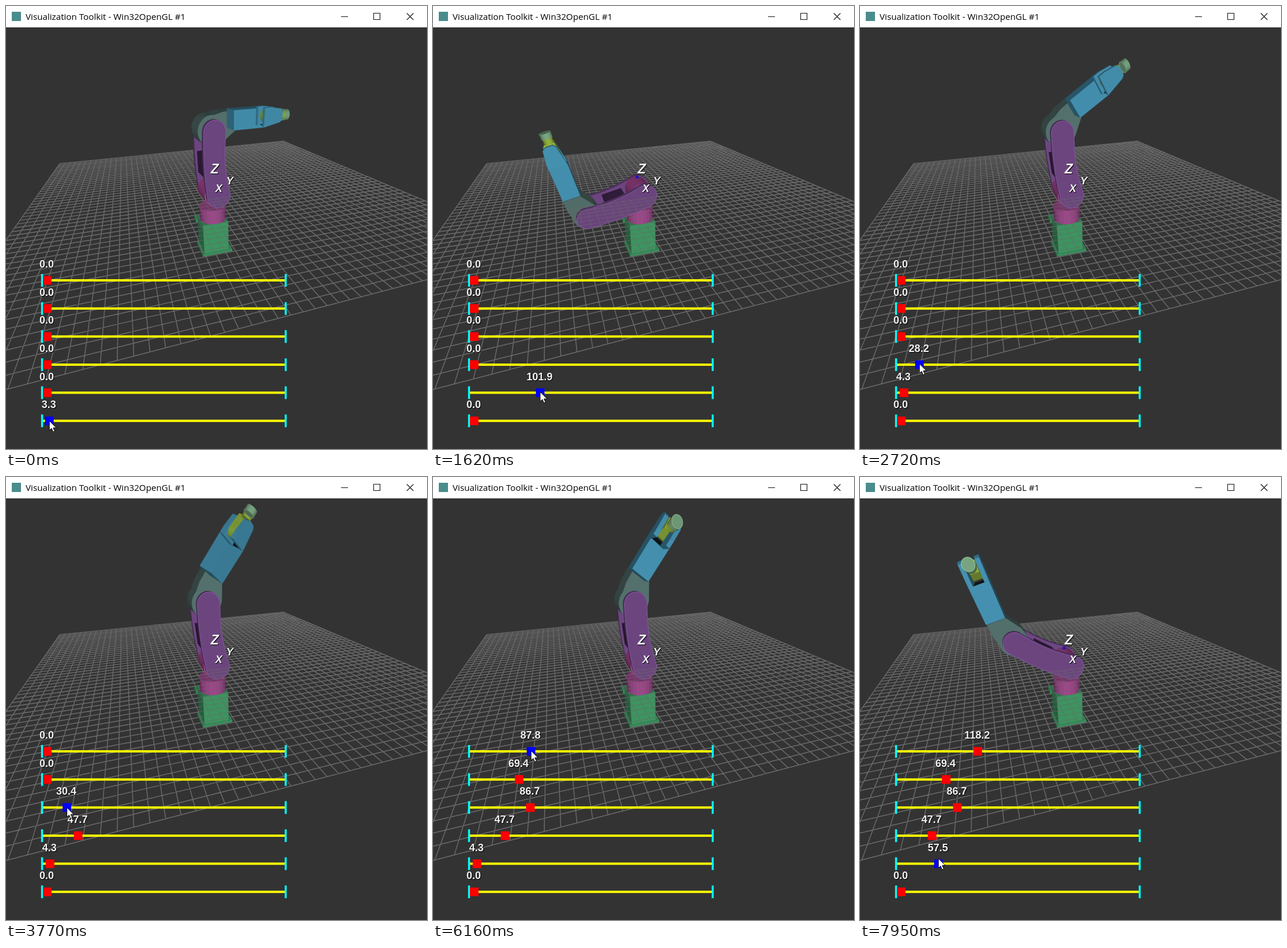
Write an HTML page that moves like this. It is 730 px wide and 767 px high and loops after 7.99 s.

```html
<!DOCTYPE html>
<html lang="en">
<head>
<meta charset="utf-8">
<title>Robot arm sliders</title>
<style>
html, body { margin: 0; width: 100%; height: 100%; overflow: hidden; background: #333; }
svg { display: block; width: 730px; height: 767px; }
.title { font: 15.2px "Open Sans", "Noto Sans", sans-serif; }
.label { font: bold 18px "Liberation Sans", Arial, sans-serif; text-anchor: middle; fill: #f2f2f2; text-shadow: 1px 1px 1px #000; }
.axis { font-style: italic; }
</style>
</head>
<body>
<svg viewBox="0 0 730 767">
  <defs>
    <clipPath id="below"><path d="M0 767H730V280L0 382Z"/></clipPath>
    <path id="grid" fill="none" stroke="#696969" stroke-width="1.4"/>
  </defs>
  <rect width="730" height="767" fill="#333"/>
  <use href="#grid"/>
  <g id="arm" stroke-linejoin="round"></g>
  <g clip-path="url(#below)" opacity="0.5"><use href="#grid"/></g>
  <g class="label axis">
    <text x="362" y="290" style="font-size:23px">Z</text>
    <text x="369" y="322">X</text>
    <text x="388" y="309">Y</text>
  </g>
  <g id="sliders"></g>
  <rect width="730" height="37" fill="#fff"/>
  <rect x="10" y="10" width="16" height="16" fill="#4a8c8c"/>
  <text class="title" x="34" y="24">Visualization Toolkit - Win32OpenGL #1</text>
  <path d="M581 18.5H593M637.5 12.5H648.5V23.5H637.5ZM695 12.5L706.5 24M706.5 12.5L695 24" fill="none" stroke="#111" stroke-width="1.1"/>
  <path id="cursor" d="M0 0V16.5L3.8 13L6.5 19.2L9.3 18L6.6 12H12Z" fill="#fff" stroke="#000" stroke-width="1"/>
</svg>
<script>
const LOOP = 7990;
const $ = id => document.getElementById(id);
const lerp = (a, b, f) => a + (b - a) * f;
const clamp = f => Math.max(0, Math.min(1, f));
const smooth = f => f * f * (3 - 2 * f);

// Sliders count from the top; lift is where the pointer ends, relative to the row
const START = [0, 0, 0, 0, 0, 3.3];
const drags = [
  [5, 0, 530, 2.2, -15],
  [5, 580, 800, 0, -15],
  [4, 950, 1600, 101.9, -2],
  [4, 1660, 2400, 4.3, -2],
  [3, 2570, 2700, 28.2, -3],
  [3, 2740, 3150, 47.7, -3],
  [2, 3550, 4180, 86.7, 0],
  [1, 4750, 5400, 69.4, -2],
  [0, 5750, 6140, 87.8, -2],
  [0, 6180, 6400, 118.2, -2],
  [4, 6850, 7930, 57.5, -9]
].map(([slider, from, to, value, lift]) => ({ slider, from, to, value, lift }));

const rowY = i => 475 + 48.65 * i;
const knobX = v => 71.5 + 1.1222 * v;

function valuesAt(t) {
  const values = [...START];
  for (const d of drags)
    values[d.slider] = lerp(values[d.slider], d.value, clamp((t - d.from) / (d.to - d.from)));
  return values;
}

function pointerAt(t, values) {
  const i = drags.findLastIndex(d => d.from <= t), d = drags[i], next = drags[i + 1];
  const x = knobX(values[d.slider]);
  const y = rowY(d.slider) + d.lift * clamp((t - d.from) / (d.to - d.from));
  if (t <= d.to || !next) return [x, y];
  const f = smooth((t - d.to) / (next.from - d.to));
  return [lerp(x, knobX(values[next.slider]), f), lerp(y, rowY(next.slider), f)];
}

function heldAt(t) {
  const i = drags.findLastIndex(d => d.from <= t), d = drags[i], next = drags[i + 1];
  const same = next && next.slider === d.slider;
  return same || t <= d.to + 40 ? d.slider : -1;
}

// Camera: x runs along the arm, y towards the viewer, z up
const eye = [-192, 740, 304];
const depth = ([x, y, z]) => 0.731 + 0.000204 * x - 0.000742 * y - 0.0004714 * z;
function project(p) {
  const [x, y, z] = p, w = depth(p);
  return [(260.85 + 0.4861 * x - 0.1505 * y - 0.1846 * z) / w,
          (234 + 0.0087 * x - 0.0867 * y - 0.554 * z) / w];
}
const pathOf = pts => "M" + pts.map(p => project(p).map(n => n.toFixed(1)).join(" ")).join("L");

const sub = (a, b) => a.map((n, i) => n - b[i]);
const dot = (a, b) => a[0] * b[0] + a[1] * b[1] + a[2] * b[2];
const cross = (a, b) => [a[1] * b[2] - a[2] * b[1], a[2] * b[0] - a[0] * b[2], a[0] * b[1] - a[1] * b[0]];
const mean = pts => [0, 1, 2].map(i => pts.reduce((s, p) => s + p[i], 0) / pts.length);
const shift = (p, x, y, z) => [p[0] + x, p[1] + y, p[2] + z];
function rot(p, i, j, deg) {
  const c = Math.cos(deg * Math.PI / 180), s = Math.sin(deg * Math.PI / 180), q = [...p];
  q[i] = p[i] * c - p[j] * s;
  q[j] = p[i] * s + p[j] * c;
  return q;
}

function arc(cx, cy, r, from, to, n = 14) {
  return Array.from({ length: n + 1 }, (_, i) => {
    const a = lerp(from, to, i / n) * Math.PI / 180;
    return [cx + r * Math.cos(a), cy + r * Math.sin(a)];
  });
}
const circle = r => arc(0, 0, r, 0, 345, 23);
const box = (x0, y0, x1, y1) => [[x0, y0], [x1, y0], [x1, y1], [x0, y1]];

function face(pts, normal, color, rim) {
  const view = sub(eye, mean(pts)), facing = dot(normal, view);
  if (facing <= 0) return "";
  const lit = 0.48 + 0.54 * facing / Math.sqrt(dot(normal, normal) * dot(view, view));
  const tint = k => `rgb(${color.map(c => Math.min(255, Math.round(c * k)))})`;
  return `<path d="${pathOf(pts)}Z" fill="${tint(lit)}" stroke="${tint(rim ? lit * 1.22 : lit)}" stroke-width="${rim ? 1.1 : 0.6}"/>`;
}

// Sweeps a flat outline along one axis, placed in the world by a joint chain
function prism(outline, axis, lo, hi, place, color, rim = false) {
  const ring = t => outline.map(([u, v]) =>
    place(axis === 0 ? [t, u, v] : axis === 1 ? [u, t, v] : [u, v, t]));
  const a = ring(lo), b = ring(hi), n = a.length, along = sub(b[0], a[0]);
  let area = [0, 0, 0];
  b.forEach((p, i) => {
    const c = cross(sub(p, b[0]), sub(b[(i + 1) % n], b[0]));
    area = area.map((v, k) => v + c[k]);
  });
  const sign = Math.sign(dot(area, along));
  let svg = "";
  for (let i = 0; i < n; i++) {
    const j = (i + 1) % n;
    const out = cross(sub(a[j], a[i]), along).map(v => v * sign);
    svg += face([a[i], a[j], b[j], b[i]], out, color);
  }
  svg += face(a, along.map(v => -v), color, rim) + face(b, along, color, rim);
  return { svg, far: depth(mean([...a, ...b])) };
}

const GREEN = [66, 160, 104], PINK = [168, 72, 146], PURPLE = [110, 71, 130],
  DARK = [66, 40, 80], SLATE = [84, 112, 108], BLUE = [68, 143, 174],
  LIME = [146, 176, 62], SAGE = [122, 166, 130], SHADE = [26, 36, 40];
const ELBOW = [-7, 0, 172], PIVOT = 172;

// One long side of the upper link, bowed between its two round ends
const edge = (side, bend) => Array.from({ length: 9 }, (_, i) => {
  const t = (i + 1) / 10;
  return [ELBOW[0] * t + side * lerp(34, 29, t) - bend * Math.sin(Math.PI * t), ELBOW[2] * t];
});
const plate = [
  ...arc(0, 0, 34, 180, 360), ...edge(1, 8),
  ...arc(ELBOW[0], ELBOW[2], 29, 0, 180), ...edge(-1, 4).reverse()
];
const housing = [...arc(0, 0, 38, 80, 270), [25, -31], [62, -4], [62, 44], [30, 43]];
const prong = [[148, -24], [196, -14], [202, -8], [202, 10], [197, 19], [165, 24], [148, 24]];
const drum = [...arc(0, 0, 17, 90, 270), [34, -13], [34, 13]];

function drawArm(q) {
  const ground = p => p;
  const turret = p => rot(p, 0, 1, -q[5]);
  const upper = p => turret(shift(rot(p, 0, 2, q[4]), 5, 0, 0));
  const fore = p => upper(shift(rot(p, 0, 2, q[3]), ...ELBOW));
  const roll = p => fore(shift(rot(p, 2, 1, q[2]), 2, 0, 20));
  const wrist = p => roll(shift(rot(p, 0, 2, q[1]), PIVOT, 0, 0));

  const hand = [
    prism(prong, 1, -25, -14, roll, BLUE),
    prism(prong, 1, 14, 25, roll, BLUE),
    prism(drum, 1, -14, 14, wrist, LIME),
    prism(circle(12), 0, 34, 46, wrist, LIME),
    prism(circle(14), 0, 46, 59, wrist, SAGE, true)
  ].sort((a, b) => b.far - a.far);

  const svg = parts => parts.map(p => p.svg).join("");
  $("arm").innerHTML = svg([
    prism(box(-48, -40, 50, 40), 2, -200, -192, ground, GREEN),
    prism(box(-52, -38, -42, -10), 2, -104, -90, ground, GREEN),
    prism(box(-42, -36, 38, 36), 2, -192, -90, ground, GREEN),
    prism(circle(40), 2, -90, -45, turret, PINK),
    prism(plate, 1, -50, -36, upper, PURPLE),
    prism(circle(33), 1, -34, 36, turret, PINK),
    prism(box(-32, 50, 12, 110), 1, -36, 36, upper, DARK)
  ]) + '<circle cx="354" cy="296" r="2.6" fill="#1414c8"/>' + svg([
    prism(housing, 1, -30, 30, fore, SLATE),
    prism(box(60, -24, 148, 24), 1, -25, 25, roll, BLUE),
    prism(box(-14, -20, 14, 20), 0, 148, 149, roll, SHADE),
    ...hand,
    prism(plate, 1, 36, 50, upper, PURPLE, true)
  ]);
}

function buildGrid() {
  let d = "";
  for (let k = -500; k <= 500; k += 20)
    d += pathOf([[k, -500, 0], [k, 500, 0]]) + pathOf([[-500, k, 0], [500, k, 0]]);
  $("grid").setAttribute("d", d);
}

const sliders = START.map((_, i) => {
  const y = rowY(i), g = document.createElementNS("http://www.w3.org/2000/svg", "g");
  g.innerHTML = `<path d="M62 ${y}H485" stroke="#ff0" stroke-width="4"/>
    <path d="M62.5 ${y - 11}v22M485 ${y - 11}v22" stroke="#0ff" stroke-width="3.4"/>
    <rect y="${y - 7.5}" width="15" height="15"/>
    <text class="label" y="${y - 22}"></text>`;
  $("sliders").append(g);
  return { knob: g.querySelector("rect"), label: g.querySelector("text") };
});

function render(t) {
  const values = valuesAt(t), held = heldAt(t);
  sliders.forEach(({ knob, label }, i) => {
    const x = knobX(values[i]);
    knob.setAttribute("x", x - 7.5);
    knob.setAttribute("fill", i === held ? "#00f" : "#f00");
    label.setAttribute("x", x - 1);
    label.textContent = values[i].toFixed(1);
  });
  drawArm(values);
  $("cursor").setAttribute("transform", `translate(${pointerAt(t, values)})`);
}

function tick() {
  render(performance.now() % LOOP);
  requestAnimationFrame(tick);
}
buildGrid();
tick();
</script>
</body>
</html>
```
